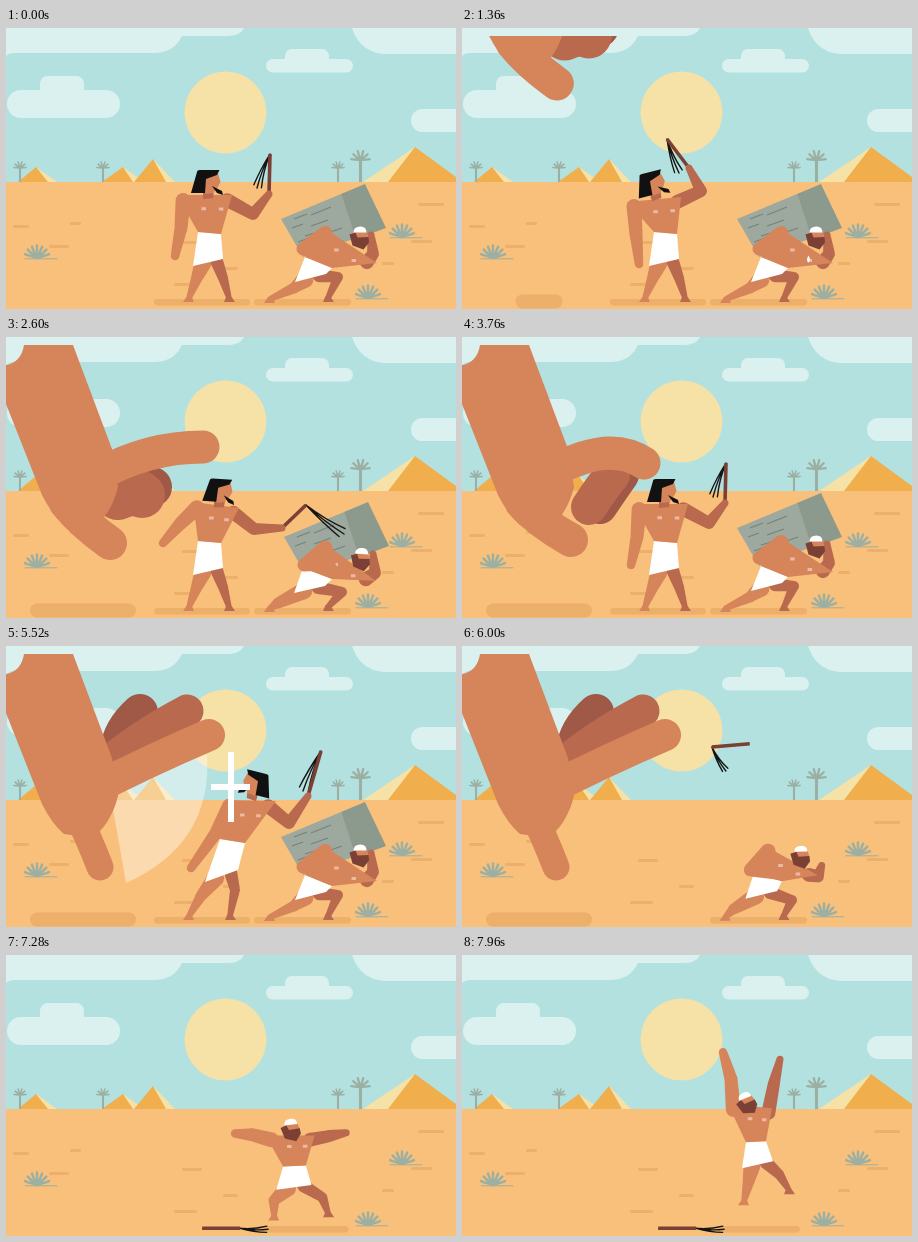
Write an HTML page that moves like this. It is 450 by 281 pixels and loops after 8 s.

```html
<!DOCTYPE html>
<html lang="en">
<head>
<meta charset="utf-8">
<title>Desert flick</title>
<style>
html, body { margin: 0; width: 100%; height: 100%; overflow: hidden; background: #b3e1df; }
svg { display: block; width: 100%; height: 100%; }
</style>
</head>
<body>
<svg id="stage" viewBox="0 0 450 281" xmlns="http://www.w3.org/2000/svg">
  <defs><clipPath id="below"><rect y="8" width="450" height="273"/></clipPath></defs>
  <rect width="450" height="281" fill="#b3e1df"/>
  <g fill="#dbf1f0">
    <path d="M0 0H238Q234 8 222 8H176Q168 25 148 25H8Q3 25 0 28Z"/>
    <path d="M346 0H450V26H378Q354 24 346 0Z"/>
    <rect x="1" y="62" width="113" height="28" rx="14"/>
    <rect x="34" y="48" width="44" height="26" rx="8"/>
    <rect x="260" y="31" width="87" height="13.5" rx="6.7"/>
    <rect x="279" y="21" width="44" height="18" rx="7"/>
    <rect x="405" y="81" width="70" height="23" rx="11.5"/>
  </g>
  <circle cx="219.5" cy="84.5" r="41" fill="#f6e1a7"/>
  <path fill="#f6e1a7" d="M30 139L51 154H34ZM117 139L138 154H122ZM147 131L169 154H155ZM409 119L357 154H392Z"/>
  <path fill="#f0af4c" d="M30 139L12 154H42ZM117 139L96 154H127ZM147 131L128 154H160ZM409 119L382 154H457Z"/>
  <rect y="154" width="450" height="127" fill="#f8c07a"/>
  <g id="dashes" fill="#ecb06b"></g>
  <g id="plants" fill="none" stroke="#9cafa3" stroke-linecap="round"></g>
  <g id="shadows" fill="#ecb06b"></g>
  <g id="scene"></g>
</svg>
<script>
const LIGHT = '#d6845a', DARK = '#b9694d', DEEP = '#a05847', BROWN = '#7a4035';
const NS = 'http://www.w3.org/2000/svg';
const $ = id => document.getElementById(id);

function add(parent, tag, attrs = {}) {
  const el = document.createElementNS(NS, tag);
  for (const k in attrs) el.setAttribute(k, attrs[k]);
  parent.appendChild(el);
  return el;
}
const set = (el, k, v) => el.setAttribute(k, v);
const show = (el, on) => set(el, 'visibility', on ? 'visible' : 'hidden');
const shape = (parent, fill, d = '') => add(parent, 'path', { fill, d });
const clamp = v => Math.max(0, Math.min(1, v));
const smooth = v => v * v * (3 - 2 * v);
const linear = v => v;
const mix = (a, b, k) => a.map((v, i) => v + (b[i] - v) * k);
const poly = pts => 'M' + pts.map(p => p[0].toFixed(2) + ' ' + p[1].toFixed(2)).join('L') + 'Z';

// Value of a keyed list [[time, numbers], ...] at time t.
function at(keys, t, ease = smooth) {
  let i = 0;
  while (i < keys.length - 1 && t >= keys[i + 1][0]) i++;
  if (i === keys.length - 1) return keys[i][1];
  const [a, p] = keys[i], [b, q] = keys[i + 1];
  return mix(p, q, ease(clamp((t - a) / (b - a))));
}

// ---- Scenery ----
for (const [x, y, w] of [[7, 197, 16], [64, 194, 11], [43, 217, 20], [176, 213, 20], [217, 239, 15],
  [168, 255, 23], [412, 175, 26], [405, 212, 21], [376, 234, 12]])
  add($('dashes'), 'rect', { x, y, width: w, height: 3, rx: 1 });

function fan(x, y, len, spread, count, width) {
  let d = '';
  for (let i = 0; i < count; i++) {
    const a = spread * (2 * i / (count - 1) - 1) * Math.PI / 180;
    const s = len * Math.sin(a), c = len * Math.cos(a);
    d += `M${x} ${y}Q${x + s * .65} ${y - c * .55} ${x + s} ${y - c}`;
  }
  add($('plants'), 'path', { d, 'stroke-width': width });
}
for (const [x, top, r] of [[14, 140, 6.2], [97, 140, 6.2], [332, 140, 6.2], [354.500, 132, 9.2]]) {
  add($('plants'), 'path', { d: `M${x} ${top}V154`, 'stroke-width': r / 3, 'stroke-linecap': 'butt' });
  fan(x, top, r, 85, 6, r / 4);
}
for (const [x, y] of [[31, 230], [396, 209], [362, 270]]) {
  add($('plants'), 'path', { d: `M${x - 12} ${y + .8}H${x + 20}`, 'stroke-width': 1 });
  fan(x, y, 12.5, 72, 7, 2.5);
}
const pill = () => add($('shadows'), 'rect', { rx: 3.4, y: 271, height: 6.5 });
const lordShadow = pill(), slaveShadow = pill(), handShadow = pill();
set(handShadow, 'y', 266.5); set(handShadow, 'height', 14); set(handShadow, 'rx', 7);
function spread(el, x0, x1) { set(el, 'x', x0); set(el, 'width', Math.max(0, x1 - x0)); }

// ---- Giant hand ----
const scene = $('scene');
const handClip = add(scene, 'g', { 'clip-path': 'url(#below)' });
const swoosh = add(handClip, 'path', { fill: '#fff', d: 'M120 237Q207 198 201 108L104 146Z' });
const hand = add(handClip, 'g');
const finger = stroke => add(hand, 'path', { fill: 'none', stroke, 'stroke-linecap': 'round' });
const ring = finger(DEEP), middle = finger(DARK);
shape(hand, LIGHT, 'M18 8H67L106 112L112 150Q105 178 86 192L58 188Q46 178 36 158L-4 57V29Q15 27 18 8Z');
const index = finger(LIGHT), thumb = finger(LIGHT);

// Four curves (ring, middle, index, thumb): three points and a width each.
const POINTING = [128, 152, 140, 146, 146, 150, 40, 112, 160, 130, 152, 136, 158, 46,
  92, 138, 142, 110, 197, 110, 33, 60, 166, 76, 186, 104, 206, 34];
const CURLED = [160, 138, 150, 152, 138, 170, 34, 150, 138, 140, 150, 127, 170, 36,
  88, 136, 146, 102, 182, 126, 33, 60, 166, 78, 186, 109, 203, 34];
const OPEN = [112, 104, 114, 84, 134, 66, 36, 96, 122, 130, 92, 181, 65, 33,
  82, 146, 140, 116, 203, 89, 32, 70, 166, 82, 190, 94, 221, 27];

function drawHand(t) {
  const down = .5 - .5 * Math.cos(Math.PI * clamp((t - 800) / 1400));
  const up = clamp((t - 6180) / 300) ** 2;
  const p = down * (1 - up);
  const curves = t >= 5520 ? OPEN : at([[3360, POINTING], [3760, CURLED]], t);
  [ring, middle, index, thumb].forEach((el, i) => {
    const [ax, ay, bx, by, cx, cy, w] = curves.slice(i * 7, i * 7 + 7);
    set(el, 'd', `M${ax} ${ay}Q${bx} ${by} ${cx} ${cy}`);
    set(el, 'stroke-width', w);
  });
  set(hand, 'transform', `translate(${-14 * (1 - p)} ${-230 * (1 - p)})`);
  show(hand, t > 800 && t < 6480);
  spread(handShadow, 69 - 45 * p, 85 + 45 * p);
  show(handShadow, t > 840 && t < 6560);
  show(swoosh, t >= 5520 && t < 5640);
  set(swoosh, 'opacity', .4 * (1 - clamp((t - 5540) / 110)));
}

// ---- Figures ----
// Pose: head x, y, tilt, flip, then joints in the order of J, with whip tip and tail last.
const J = { shL: 0, elL: 1, haL: 2, shR: 3, elR: 4, haR: 5, wL: 6, wR: 7, hemL: 8, hemR: 9,
  knL: 10, ftL: 11, knR: 12, ftR: 13, tip: 14, tail: 15 };
const joint = (p, n) => p.slice(4 + 2 * J[n], 6 + 2 * J[n]);
function pose(base, head, joints) {
  const p = base.slice();
  p.splice(0, 4, ...head);
  for (const n in joints) p.splice(4 + 2 * J[n], 2, ...joints[n]);
  return p;
}

function taper(a, b, wa, wb) {
  const dx = b[0] - a[0], dy = b[1] - a[1], l = Math.hypot(dx, dy) || 1;
  const n = [-dy / l / 2, dx / l / 2];
  const off = (p, w) => [p[0] + n[0] * w, p[1] + n[1] * w];
  return poly([off(a, wa), off(b, wb), off(b, -wb), off(a, -wa)]);
}
const disc = ([x, y], r) => `M${x - r} ${y}a${r} ${r} 0 0 0 ${2 * r} 0a${r} ${r} 0 0 0 ${-2 * r} 0Z`;
const limb = (a, b, c, w) =>
  taper(a, b, w[0], w[1]) + taper(b, c, w[1], w[2]) + disc(a, w[0] / 2) + disc(b, w[1] / 2) + disc(c, w[2] / 2);
const footL = ([x, y]) => poly([[x - 6, y + 4], [x + 5, y + 4], [x + 2.5, y - 2], [x - 2, y - 2]]);
const footR = ([x, y]) => poly([[x + 2, y - 2], [x - 2.5, y - 2], [x - 5, y + 4], [x + 6, y + 4]]);

function figure(headParts) {
  const g = add(scene, 'g'), f = { g };
  for (const [n, c] of [['legR', DARK], ['legL', LIGHT], ['skirt', '#fff'], ['armR', DARK],
    ['torso', LIGHT], ['chest', '#edb9a4'], ['armL', LIGHT]]) f[n] = shape(g, c);
  f.head = add(g, 'g');
  for (const [c, d] of headParts) shape(f.head, c, d);
  return f;
}

function drawFigure(f, p) {
  const j = {};
  for (const n in J) j[n] = joint(p, n);
  set(f.legL, 'd', limb(mix(j.hemL, j.hemR, .32), j.knL, j.ftL, [17, 11, 5.5]) + footL(j.ftL));
  set(f.legR, 'd', limb(mix(j.hemL, j.hemR, .78), j.knR, j.ftR, [13, 10, 5.5]) + footR(j.ftR));
  set(f.skirt, 'd', poly([j.wL, j.wR, j.hemR, j.hemL]));
  set(f.torso, 'd', poly([j.shL, mix(j.shL, j.shR, .5), j.shR, mix(j.shR, j.wR, .1), j.wR, j.wL]));
  set(f.armL, 'd', limb(mix(j.shL, j.wR, .14), j.elL, j.haL, [15, 13, 8.5]));
  set(f.armR, 'd', limb(mix(j.shR, j.wL, .14), j.elR, j.haR, [14, 12, 7]));
  const a = mix(j.shL, j.wL, .36), b = mix(j.shR, j.wR, .36);
  set(f.chest, 'd', [.44, .84].map(k => {
    const [x, y] = mix(a, b, k);
    return `M${x - 2.3} ${y - 1.5}h4.6v3h-4.6Z`;
  }).join(''));
  set(f.head, 'transform', `translate(${p[0]} ${p[1]}) rotate(${p[2]}) scale(${p[3]} 1)`);
}

// Overseer, head origin at the base of the neck
const REST = [203, 168, 0, 1, 171, 167, 175, 200, 169, 228, 226, 167, 247, 186, 263, 166,
  192, 204, 215, 206, 187, 238, 217, 231, 190, 252, 183, 270, 217, 250, 223, 270, 264, 126, 251, 160];
const PULL = pose(REST, [195, 169, -14, 1], { shL: [165, 174], elL: [174, 206], haL: [177, 236], shR: [219, 169],
  elR: [239, 163], haR: [227, 140], tip: [205, 111], tail: [217, 145] });
const STRIKE = pose(REST, [214, 168, 4, 1], { shL: [187, 165], elL: [174, 187], haL: [157, 206], shR: [233, 171],
  elR: [248, 192], haR: [276, 191], tip: [300, 168], tail: [338, 197] });
const LOOK = pose(REST, [199, 168, 0, -1], { shL: [169, 167], elL: [173, 199], haL: [166, 227], tip: [264, 125] });
const HIT = pose(REST, [245, 151, 14, -1], { shL: [221, 154], elL: [210, 187], haL: [185, 222], shR: [270, 155],
  elR: [283, 177], haR: [302, 150], wL: [214, 193], wR: [239, 197], hemL: [199, 236], hemR: [232, 224],
  knL: [195, 250], knR: [229, 244], ftR: [224, 270], tip: [315, 105], tail: [297, 145] });

// Labourer, head origin at the middle of the face
const CARRY = [354.500, 205.500, 0, 1, 318, 200, 297, 221, 324, 223, 371, 235, 367, 226, 365, 207,
  299, 229, 326, 240, 289, 254, 320, 246, 288, 260, 264, 271, 332, 249, 322, 270, 0, 0, 0, 0];
const BUCKLE = pose(CARRY, [356, 218, 4, 1], { shL: [318, 206], elL: [298, 228], haL: [326, 229], shR: [370, 244],
  elR: [369, 236], haR: [367, 217], wL: [297, 231], wR: [326, 242], hemL: [288, 256], hemR: [319, 249],
  knL: [272, 266], knR: [336, 255] });
const STAND = pose(CARRY, [281, 167, -18, 1], { shL: [254, 180], elL: [254, 209], haL: [284, 232], shR: [306, 177],
  elR: [310, 211], haR: [334, 228], wL: [274, 214], wR: [298, 212], hemL: [267, 241], hemR: [302, 231],
  knL: [271, 252], ftL: [262, 270], knR: [309, 251], ftR: [320, 270] });
const CROUCH = pose(STAND, [286, 184, 0, 1], { shL: [257, 196], elL: [236, 206], haL: [215, 216], shR: [308, 194],
  elR: [328, 206], haR: [350, 212], wL: [274, 224], wR: [298, 223], hemL: [266, 246], hemR: [303, 242],
  knL: [260, 254], knR: [316, 254] });
const JUMP = pose(CARRY, [284, 144, -22, 1], { shL: [266, 149], elL: [269, 124], haL: [261, 97], shR: [310, 153],
  elR: [312, 128], haR: [318, 104], wL: [284, 187], wR: [304, 186], hemL: [280, 213], hemR: [311, 206],
  knL: [286, 229], ftL: [282, 246], knR: [317, 219], ftR: [327, 235] });

const block = add(scene, 'g');
shape(block, '#9da99f', 'M275 191L335 166L350 210L297 229Z');
shape(block, '#8c998d', 'M335 166L359 156L380 200L350 211Z');
add(block, 'path', { stroke: '#74837a', 'stroke-width': 1.2, d:
  'M288 191l13 -5M305 187l20 -8M286 200l11 -4M305 198l17 -6M299 208l13 -4M319 206l17 -6M292 214l11 -4M313 214l14 -5' });

const slave = figure([
  [LIGHT, 'M-6 -2H6L8 4L3 9L-6 10Z'],
  [BROWN, 'M-11 1L-5 -1L-3 4L8 3.500L8.500 9L3 16L-8 12Z'],
  ['#fff', 'M-7 -1Q-7 -7 0 -7Q6 -7 6 -1Z']
]);
const sweat = add(scene, 'path', { fill: '#fff', d: 'M0 -4q3 5 0 7q-3 -2 0 -7Z' });
const whipG = add(scene, 'g', { fill: 'none' });
const tails = add(whipG, 'path', { stroke: '#151515', 'stroke-width': 1.4, 'stroke-linecap': 'round' });
const handle = add(whipG, 'path', { stroke: BROWN, 'stroke-width': 3.6 });
const lord = figure([
  [DARK, 'M-6 -8L5 -6L4 2L-6 3Z'],
  [LIGHT, 'M9 -23L-4 -18V-2L4 -3L9 -9L11.500 -14Z'],
  ['#111', 'M-12 -24Q-12 -26 -9 -26H10.500L8 -21L-3 -17L-4 -3H-18Z'],
  ['#111', 'M3 -10L13 -5L14 -1L8 -3Z']
]);
const flash = add(scene, 'path', { fill: '#fff', d: 'M222 106h6v32h16v6h-16v32h-6v-32h-17v-6h17Z' });

function drawWhip(grip, tip, tail) {
  const dx = tail[0] - tip[0], dy = tail[1] - tip[1], l = Math.hypot(dx, dy) || 1;
  const n = [-dy / l, dx / l], s = Math.min(5, l / 9);
  const off = (k, w) => [tip[0] + dx * k + n[0] * w, tip[1] + dy * k + n[1] * w];
  set(tails, 'd', [-1, 0, 1].map(i => `M${tip}Q${off(.5, i * s * .4 + 2)} ${off(1 - i * i * .05, i * s)}`).join(''));
  set(handle, 'd', `M${grip}L${tip}`);
}

function flyingWhip(t) {
  const s = Math.min(t - 5560, 1450) / 1000;
  const x = 308 - 99.9 * s + 24.7 * s * s;
  const y = 127 - 134 * s + 162 * s * s;
  const [deg, tx, ty] = at([[5560, [-73, -17, 39]], [6000, [-185, 14, 24]], [6480, [-306, 1, -38]],
    [7000, [-360, 28, 1]]], t, linear);
  const a = deg * Math.PI / 180, c = 19 * Math.cos(a), d = 19 * Math.sin(a);
  drawWhip([x - c, y - d], [x + c, y + d], [x + c + tx, y + d + ty]);
}

function drawLord(t, beat) {
  const keys = t < 4200
    ? [[0, REST], [300, PULL], [410, PULL], [510, STRIKE], [640, STRIKE], [1040, REST]]
    : [[4200, REST], [4680, LOOK]];
  const p = t >= 5520 ? HIT : at(keys, t < 4200 ? beat : t);
  const s = Math.max(0, t - 5550) / 1000;
  drawFigure(lord, p);
  set(lord.g, 'transform', `translate(${900 * s} ${-170 * s}) rotate(${260 * s} 240 190)`);
  show(lord.g, t < 6000);
  show(flash, t >= 5520 && t < 5600);
  spread(lordShadow, 148 + 900 * s, 244 + 900 * s);
  show(lordShadow, t < 6000);
  if (t < 5560) drawWhip(joint(p, 'haR'), joint(p, 'tip'), joint(p, 'tail'));
  else flyingWhip(t);
}

function drawSlave(t, beat) {
  const load = at([[0, [0]], [430, [0]], [510, [1]], [680, [1]], [1000, [0]]], beat)[0];
  const grounded = JUMP.map((v, i) => i === 1 || (i > 3 && i % 2) ? v + 24 : v);
  const p = t < 5600 ? mix(CARRY, BUCKLE, load) : at([[5600, CARRY], [5720, BUCKLE], [5860, BUCKLE],
    [6320, STAND], [7060, STAND], [7210, CROUCH], [7400, grounded]], t);
  const h = 82 * Math.max(0, 1 - ((t - 7640) / 380) ** 2);
  drawFigure(slave, p);
  set(slave.g, 'transform', `translate(0 ${-h})`);
  spread(slaveShadow, 248 + h * .3, 345 - h * .3);

  const s = Math.max(0, t - 5600) / 1000;
  set(block, 'transform', `translate(${3 * load + 800 * s} ${9 * load - 120 * s}) rotate(${200 * s} 327 193)`);
  show(block, t < 6000);

  const fall = (beat - 240) / 200;
  show(sweat, t < 3120 && fall > 0 && fall < 1);
  set(sweat, 'transform', `translate(346.500 ${226 + 34 * fall * fall})`);
}

function render(t) {
  const beat = t < 2080 ? t % 1040 : t - 2080;
  drawHand(t);
  drawSlave(t, beat);
  drawLord(t, beat);
}

let start = null;
function frame(now) {
  if (start === null) start = now;
  render((now - start) % 8000);
  requestAnimationFrame(frame);
}
render(0);
requestAnimationFrame(frame);
</script>
</body>
</html>
```
